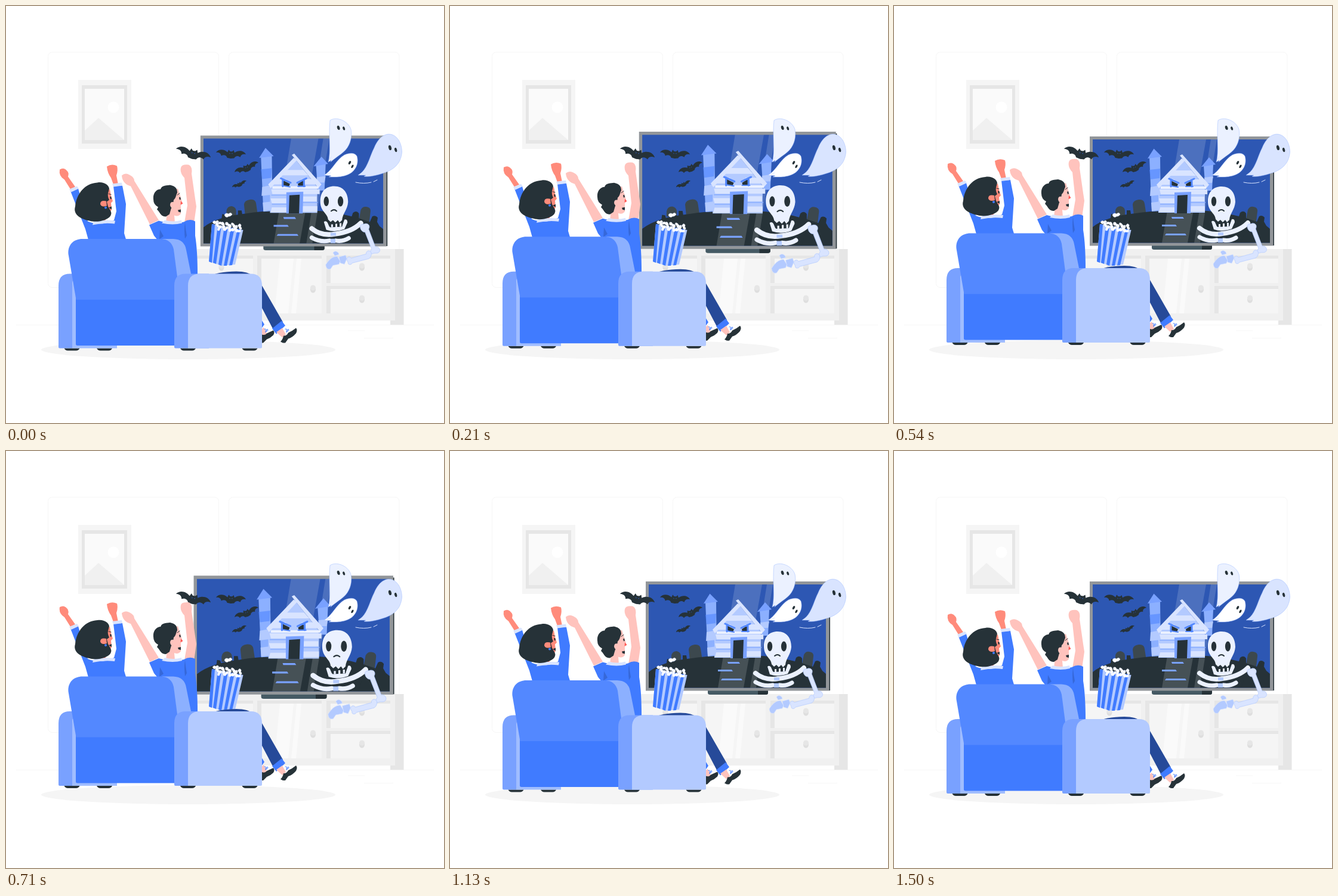
An HTML page for the animation above (1.54 s loop, 734 by 700 pixels).

```html
<!DOCTYPE html>
<html lang="en">
<head>
<meta charset="utf-8">
<title>Scary movie night</title>
<style>
  html, body { margin: 0; width: 100%; height: 100%; overflow: hidden; background: #fff; }
  svg { display: block; width: 100vw; height: 100vh; }
  .ink { fill: #263238; }
  .stone { fill: #3c484e; }
  .navy { fill: #2d57b3; }
  .denim { fill: #264a99; }
  .blue { fill: #407bff; }
  .blue2 { fill: #5388ff; }
  .blue3 { fill: #79a1ff; }
  .blue4 { fill: #8cb0ff; }
  .blue5 { fill: #b3caff; }
  .blue6 { fill: #d9e4ff; }
  .bone { fill: #ebf1ff; }
  .g1 { fill: #fafafa; }
  .g2 { fill: #f5f5f5; }
  .g3 { fill: #f0f0f0; }
  .g4 { fill: #e6e6e6; }
  .rose { fill: #ff8b7b; }
  .peach { fill: #ffc3bd; }
  .line { fill: none; stroke-linecap: round; stroke-linejoin: round; }
</style>
</head>
<body>
<svg viewBox="0 0 734 700">
  <defs>
    <g id="bat">
      <path class="ink" d="M-30 0C-25-8-14-8-7-2L-5-7-2-4H2L5-7 7-2C14-8 25-8 30 0 24-1 20 1 19 6 14 3 9 4 7 9L0 10-7 9C-9 4-14 3-19 6-20 1-24-1-30 0Z"/>
      <path class="navy" d="M-3-1l2 1-2 1zM3-1l-2 1 2 1z"/>
    </g>
    <g id="knob"><ellipse rx="4.5" ry="5.5" cy="1" fill="#dedede"/><circle r="4.5" cy="-2" class="g4"/></g>
    <path id="foot" class="ink" d="M-13 0H13Q11 4 7 4H-7Q-11 4-13 0Z"/>
  </defs>

  <!-- room -->
  <g fill="none" stroke="#f6f6f6">
    <rect x="70.5" y="77.5" width="286" height="395" rx="7"/>
    <rect x="373.5" y="77.5" width="285.500" height="395" rx="7"/>
    <path d="M17 535.500H717M573 545H601M600 557.500H649"/>
  </g>
  <path class="g2" d="M121 124h89v116h-89z"/>
  <path class="g4" d="M127 133h76v98h-76z"/>
  <path class="g1" d="M132 139h66v86h-66z"/>
  <path class="g3" d="M132 209L155 188 198 225H132z"/>
  <circle cx="180" cy="170" r="9.500" fill="#fff"/>
  <ellipse class="g2" cx="305.500" cy="577" rx="246.500" ry="16"/>

  <!-- cabinet -->
  <path class="g3" d="M320 408H652V528H320z"/>
  <path class="g4" d="M652 408h14.500v127H644v-7h8zM320 419h94v97h-94zM421 419h108v97H421zM537 419h107v46H537zM537 470h107v46H537z"/>
  <path class="g2" d="M320 424h94v92h-94zM428 424h101v92H428zM544 424h100v41H544zM544 475h100v41H544z"/>
  <path class="g1" d="M459 424h23l-9 92h-23zM487 424h8l-9 92h-8z"/>
  <use href="#knob" x="361" y="438"/><use href="#knob" x="514.500" y="475"/>
  <use href="#knob" x="596.500" y="438"/><use href="#knob" x="596.500" y="492"/>

  <g id="tv">
    <path fill="#455a64" d="M432 402H533V406Q533 409 529 409H436Q432 409 432 406z"/>
    <path class="ink" d="M516 402H533V406Q533 409 529 409H516z"/>
    <path class="ink" d="M620 222H637V402H620z"/>
    <path fill="#92969a" d="M328 219H635.500V402.500H328z"/>
    <path class="navy" d="M333 224H630V397.500H333z"/>
    <path class="stone" d="M371 352V344Q372 336 380 336 388 338 387 346V352zM402 352L400 333Q401 326 410 325 419 324 420 332L423 352zM590 358L593 342Q596 336 602 337 610 338 609 345L607 362z"/>
    <path class="ink" d="M333 371Q344 362 363 356L364 349 369 350 370 354Q380 351 390 350L390 343 396 343 397 349Q440 342 483 343 540 342 578 353L580 347Q586 342 590 348L590 356 608 362 612 353Q617 350 621 355L620 362 624 369 630 374V397.500H333z"/>
    <path fill="#fff" opacity=".15" d="M478 224h45l-31 173.500h-43zM531 224h10l-28 173.500h-10z"/>

    <!-- house -->
    <path class="blue4" d="M428 254L446 252 447 344 432 345zM519 268L535 266 533 310H522z"/>
    <path class="blue2" d="M428 275L446 273 445 289 430 291z" opacity=".65"/>
    <path class="blue5" d="M430 304L446 301V317L429 319zM431 330L447 328V342L432 344zM520 288L535 286 533 297H521z"/>
    <path class="blue3" d="M425 256L435.500 239.500 449 253zM515 270L528 254 539 266z"/>
    <path class="blue5" d="M483 256L443 305V347H521V304z"/>
    <path class="blue6" d="M471 276H498L506 285H463zM455 291H470V300H446zM494 291H513L520 300H498z"/>
    <path class="blue6" d="M445 308H525V316H447zM444 323H470V331H446zM496 320H520V328H496zM446 338H471V346H444zM495 336H521V345H495z"/>
    <path class="blue4" d="M445 317h25v1.500h-25zM496 329h26v1.500h-26zM446 332h25v1.500h-25z"/>
    <path class="blue3" d="M470 313L498 312 497 348H470z"/>
    <path class="ink" d="M475 318L492 317 491 348H474z"/>
    <path class="blue6" d="M440 300L482 256 487 260 444 306zM479 251L483 249 528 300 523 306z"/>
    <path class="bone" d="M447 303H523V307H447z"/>
    <path class="ink" d="M464 293L476 299 474 304 464 301zM489 299L500 292 500 302 490 304z"/>
    <path class="line" stroke="#5388ff" stroke-width="3" d="M461 290L477 297M464 291V303M488 297L503 290M499 292V303"/>
    <path class="line" stroke="#5388ff" stroke-width="2" d="M464 302L476 304M489 303L501 303"/>
    <path class="blue3" d="M465 354h19l2 3h-20zM449 367h23l2 3h-25zM456 382h32l2 3h-36z"/>

    <!-- skeleton -->
    <path class="ink" d="M514 374Q535 360 550 359 575 358 592 365L582 397H516z"/>
    <g class="line" stroke="#ebf1ff" stroke-width="8">
      <path d="M512 373Q528 386 550 382 578 379 593 364"/>
      <path d="M512 388Q526 396 541 393M552 393Q563 395 573 389" stroke-width="7"/>
    </g>
    <path class="blue5" d="M543 380h9v5h-9zM543 390h8v7h-8z"/>
    <path class="bone" d="M532 362Q535 359 538 363L541 370 562 369 566 358Q571 357 571 363L566 374Q550 380 536 375z"/>
    <path class="ink" d="M539 358L566 355 562 370 542 371z"/>
    <path class="bone" d="M544 371v-5h3v5zM551 371v-6h3v6zM558 370v-6h3v6z"/>
    <path class="bone" d="M526 328C526 312 535 303 549 303 565 303 572 315 572 329 571 342 563 348 562 359L558 363 555 359 551 363 547 359 543 362 539 358C538 347 526 345 526 328z"/>
    <ellipse class="ink" cx="536" cy="328" rx="4.200" ry="8"/><ellipse class="ink" cx="559.500" cy="328" rx="4.600" ry="8.500"/>
    <path class="line" stroke="#263238" stroke-width="2" d="M544 344Q549 340 553 344"/>
    <g class="blue6" stroke="#b3caff" stroke-width=".7">
      <path d="M592 370C592 365 598 366 600 365 606 364 609 369 606 374L617 403C622 402 626 407 624 411 621 416 616 412 612 415 607 414 609 409 611 407L600 379C595 379 592 374 592 370z"/>
      <path d="M609 411C612 414 610 421 606 423L579 430C577 434 571 433 572 429L570 425C569 420 575 418 577 422L602 415C601 411 606 408 609 411z"/>
    </g>
    <g class="blue5" stroke="#d9e4ff" stroke-width=".7">
      <path d="M557 420L568 417 570 423 566 432 559 430z"/>
      <path d="M547 413Q551 408 556 413L557 416 550 418z"/>
      <path d="M535 433C540 425 546 419 554 419L559 427 557 432 547 434 543 440Q536 442 535 433z"/>
    </g>
  </g>

  <use href="#bat" transform="translate(314 247) rotate(14)"/>
  <use href="#bat" transform="translate(377 247.500) rotate(4) scale(.84)"/>
  <use href="#bat" transform="translate(403 271) rotate(-22) scale(.72)"/>
  <use href="#bat" transform="translate(391 299) rotate(-24) scale(.44)"/>

  <!-- ghosts -->
  <g stroke="#9ab8ff" stroke-width=".5">
    <path class="bone" d="M543 192C553 185 573 192 578 207 581 223 575 239 562 248 554 254 548 258 544 262L545 259 540 262C545 246 540 216 543 192z"/>
    <path fill="#fff" d="M588 252C592 265 585 278 573 283 561 288 550 287 541 287L545 285 533 284C546 277 553 258 567 250 576 246 585 246 588 252z"/>
    <path class="blue6" d="M634 217C648 210 663 223 663.500 245 662 266 648 276 631 281 619 285 608 287 600 286L603 284 590 284C606 275 609 253 617 238 621 228 627 220 634 217z"/>
  </g>
  <g class="ink">
    <ellipse cx="557" cy="204.500" rx="2.200" ry="3.700" transform="rotate(-18 557 204)"/>
    <ellipse cx="566" cy="205.500" rx="1.800" ry="3.200" transform="rotate(-18 566 205)"/>
    <ellipse cx="576" cy="263" rx="1.800" ry="3.200" transform="rotate(28 576 263)"/>
    <ellipse cx="580.500" cy="269" rx="1.600" ry="3" transform="rotate(28 580 269)"/>
    <ellipse cx="643.500" cy="238" rx="2.400" ry="4.300" transform="rotate(-14 643 238)"/>
    <ellipse cx="653" cy="241.500" rx="2" ry="3.700" transform="rotate(-14 653 241)"/>
  </g>
  <path class="line" stroke="#d9e4ff" d="M586 296Q600 299 612 296M616 295L622 292M592 283L598 279M542 258L545 253M538 283L544 280"/>

  <!-- popcorn -->
  <path class="blue5" d="M345 366L397.500 376 384 434 362 436 340 429z"/>
  <path class="blue" d="M345 366l5 1-5 64-5-2zM355 368l6 1-9 64-5-2zM366 370l6 1-11 65-5-2zM377 372l6 1-13 63-5 0zM388 374l5 1-14 60-5 .500z"/>
  <g fill="#fff" id="kernels" stroke="#d9e4ff" stroke-width=".5">
    <path d="M366 351Q368 346 373 349 377 345 379 350 376 354 373 353 369 357 366 351z"/>
  </g>

  <g id="sofa">
    <!-- legs -->
    <path class="denim" d="M335 456Q355 446 386 446 406 446 414 454L429 470 464 531 447 542 425 500 400 470z"/>
    <path class="blue" d="M446 542L462 529 468 537 453 551zM428 527L433 535 428 542z"/>
    <path class="peach" d="M453 548L463 541 469 552 463 557zM428 543L432 540 437 550 430 557z"/>
    <path class="ink" d="M460 564Q464 560 465 554 470 555 473 549 480 546 486 541 489 544 486 550 480 557 473 559L468 566 464 566zM424 564Q428 559 429 552 434 554 437 550L448 545Q451 548 448 553 443 558 437 560L431 566 426 566z"/>
    <path class="line" stroke="#407bff" d="M468 543Q472 541 470 548 473 540 474 545L470 548M433 543Q437 541 435 548 438 540 439 545L435 548"/>

    <!-- woman -->
    <path class="rose" d="M90 275Q97 271 102 277 106 280 104 287L116 304 108 308 98 292Q88 286 90 275zM169 270Q177 265 186 269 188 276 185 285L188 300H180L176 289Q170 281 169 270z"/>
    <path class="blue" d="M108 311L121 307 137 362Q158 371 181 360L185 345 180 303 195 302 201 333 198 382 201 392V400H140L133 375z"/>
    <path class="blue6" d="M106 308L119 303 122 307 109 313zM178 299L194 297 195 302 180 304z"/>
    <path class="rose" d="M160 315L174 308 176 319 179 328 176 331 177 342Q175 349 166 347L167 362H150V345z"/>
    <path class="blue6" d="M147 362Q164 359 183 361L182 366Q164 364 145 368z"/>
    <path class="ink" d="M116 337C118 316 132 298 153 297 164 295 172 301 173 307L171 315Q170 320 173 326L169 329 171 337C176 346 178 347 175 353 170 360 153 365 140 361 124 358 112 350 116 337z"/>
    <path class="rose" d="M168 328Q158 326 158 333 160 339 169 336z"/>
    <circle class="blue" cx="167" cy="339" r="2"/>
    <path class="ink" d="M172 339l5-2v5zM174 321l2-1 1 4-2 1z"/>
    <path class="line" stroke="#263238" d="M172 316L176 317"/>

    <!-- man -->
    <path class="peach" d="M194 285Q200 280 207 284 215 288 215 294L256 360 241 367 209 303Q195 299 194 285zM293 272Q294 266 306 267 313 270 311 282L317 324 319 337 315 365 299 364 304 335 299 289Q291 281 293 272z"/>
    <path class="blue" d="M240 368L256 361Q280 368 298 363 308 357 317 362L317 386Q321 410 321 452H262L253 392 248 386z"/>
    <path class="navy" d="M300 364Q301 376 303 386L300 391Q298 377 300 364zM258 376L264 387 257 392z" opacity=".5"/>
    <path class="peach" d="M271 312L288 307 292 319 296 332 293 335 293 349Q289 355 282 352L283 364H268L270 346z"/>
    <path class="blue6" d="M261 365L266 360Q280 364 294 360L295 365Q280 369 261 365z"/>
    <path class="ink" d="M247 325C246 314 253 308 259 308 261 301 270 302 275 301 285 303 287 308 287 314 285 317 285 323 281 326L280 333Q276 341 274 350L268 354C259 354 259 348 253 342L255 338Q247 334 247 325z"/>
    <path class="peach" d="M284 331Q275 327 275 335 276 341 284 341z"/>
    <path class="ink" d="M288 343l5-1v5l-4-1zM290 322l2-1 1 4-2 1z"/>
    <path class="line" stroke="#263238" d="M287 318L291 315"/>
    <path fill="#ff5652" d="M293 328l3.500 4-4 2z"/>

    <!-- armchair -->
    <use href="#foot" x="110.500" y="575"/><use href="#foot" x="165" y="575"/>
    <use href="#foot" x="305" y="575"/><use href="#foot" x="408.500" y="575"/>
    <path fill="#a0bdff" d="M111 470Q111 450 131 450H186V575H111z"/>
    <path class="blue3" d="M88 470Q88 450 107 450H130Q111 450 111 470V575H90Q88 575 88 573z"/>
    <path class="blue4" d="M262 391.500H280Q299 392 302 410L311 455V500H262z"/>
    <path class="blue" d="M117 490H300V570.500H120Q117 570.500 117 568z"/>
    <path class="blue2" d="M104.500 417C103 402 113 391.500 128 391.500H260Q277 392 281 409L292 493.500H117.500z"/>
    <path class="blue3" d="M282 470Q282 450 301 450H340V575H284Q282 575 282 573z"/>
    <path class="blue5" d="M305 470Q305 450 325 450H410Q429 450 429 470V573Q429 575 427 575H305z"/>
  </g>
</svg>
<script>
  const LOOP = 1540, HALF = LOOP / 2;
  const tv = document.getElementById('tv');
  const sofa = document.getElementById('sofa');
  const kernels = document.getElementById('kernels');

  // Popped corn heaped along the slanted rim of the box
  const kernel = kernels.firstElementChild;
  for (let i = 0; i < 13; i++) {
    const copy = kernel.cloneNode();
    const x = 351 + i * 3.4, y = 367 + i * .6 + (i % 3 - 1) * 4;
    copy.setAttribute('transform', `translate(${x} ${y}) rotate(${i * 67}) scale(.8) translate(-372 -351)`);
    kernels.append(copy);
  }

  const ramp = (t, from, to) => Math.min(1, Math.max(0, (t - from) / (to - from)));
  const beat = t =>
    ramp(t, 0, 150) - ramp(t, 150, 450) + ramp(t, 600, 750) - ramp(t, 750, 900);

  function draw(now) {
    const t = now % LOOP;
    const scale = 1 + .1 * beat((t + 20) % LOOP);
    const lift = 13.4 * (1 - Math.abs((t + 34) % LOOP / HALF - 1));
    tv.setAttribute('transform', `translate(482 330) scale(${scale}) translate(-482 -330)`);
    sofa.setAttribute('transform', `translate(0 ${-lift})`);
  }

  const start = performance.now();
  function tick() {
    draw(performance.now() - start);
    requestAnimationFrame(tick);
  }
  tick();
</script>
</body>
</html>
```
